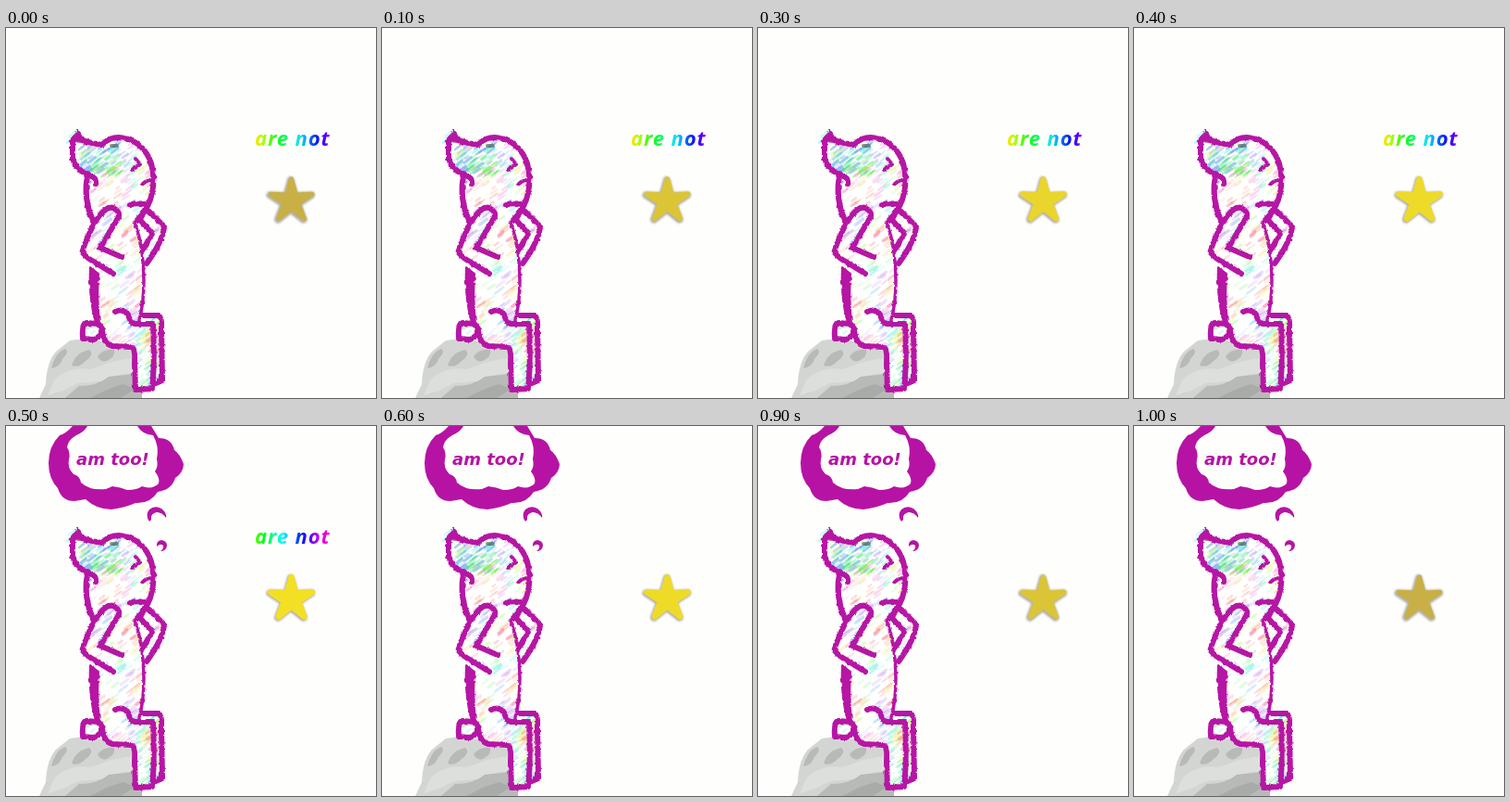
These frames come from a looping animation (400 by 399 pixels, 1.1 s). An HTML page:

```html
<!DOCTYPE html>
<html lang="en">
<head>
<meta charset="utf-8">
<title>Are not, am too</title>
<style>
  html, body { margin: 0; width: 100%; height: 100%; overflow: hidden; background: #fefefd; }
  svg { display: block; width: 400px; height: 399px; }
  .ink { fill: none; stroke: #b613a4; stroke-width: 6; stroke-linecap: round; stroke-linejoin: round; }
  .solid { fill: #b613a4; }
  .say { font: italic bold 18px "DejaVu Sans", sans-serif; }
  .reply { font: italic bold 22px "Open Sans", "Noto Sans", sans-serif; letter-spacing: .9px; fill: url(#rainbow); }
</style>
</head>
<body>
<svg viewBox="0 0 400 399">
  <defs>
    <linearGradient id="rainbow" gradientUnits="userSpaceOnUse" x1="269" x2="349" y1="0" y2="0"></linearGradient>
    <filter id="soft" x="-20%" y="-20%" width="140%" height="140%"><feGaussianBlur stdDeviation="1"/></filter>
    <filter id="rough" filterUnits="userSpaceOnUse" x="60" y="100" width="120" height="299">
      <feTurbulence type="fractalNoise" baseFrequency=".25" numOctaves="2" seed="3"/>
      <feDisplacementMap in="SourceGraphic" scale="3" xChannelSelector="R" yChannelSelector="G"/>
    </filter>
    <path id="head" d="M97 168C98 161 93 160 88 158C78 153 73 147 72 140L72 121L78 114C79 121 85 123 104 126C110 119 116 118 122 118C140 119 152 131 157 146C162 165 160 190 142 207L94 208C86 190 85 175 88 160Z"/>
    <path id="torso" d="M94 207L139 208Q149 236 149 272Q149 297 144 317L132 330L100 322Q94 300 95 258Z"/>
    <path id="arm" d="M116 265L90 249Q81 243 83 239Q94 209 104 199Q113 190 119 196Q124 200 121 205L102 237L125 247Z"/>
    <path id="farArm" d="M144 205L154 197L171 214Q170 229 152 254L148 239L158 222Z"/>
    <path id="tail" d="M100 319L86 318Q82 320 83 335L95 336Q103 333 104 324Z"/>
    <path id="leg" d="M104 326Q106 342 116 343L136 344Q140 346 139 362L140 390L158 389Q161 360 159 319L139 319Q134 317 132 309Q126 302 118 306Z"/>
    <path id="farLeg" d="M147 310L165 310Q169 312 168 325L169 380L161 383L160 319Z"/>
    <clipPath id="body"></clipPath>
  </defs>

  <g id="rock">
    <path fill="#d3d5d2" d="M36 399L43 384Q44 360 54 349L69 337L84 335L140 343L140 388L147 392V399Z"/>
    <path fill="#dddfdc" d="M53 379Q68 364 92 368Q118 357 138 356L138 372Q118 373 105 381L78 383L62 391L45 396Z"/>
    <g fill="#b8bab7">
      <path d="M49 367Q53 350 64 346Q69 349 61 357Q58 366 49 367Z"/>
      <path d="M71 364Q75 350 90 347Q96 352 86 359Q79 367 71 364Z"/>
      <path d="M99 354Q106 345 117 347Q119 354 109 359Q102 361 99 354Z"/>
      <path d="M64 399L79 386Q99 386 111 376L138 373L140 389L147 392V399Z"/>
    </g>
    <path fill="#a9aba8" d="M91 399L109 390L126 384L140 389L124 399Z"/>
  </g>

  <g id="skin" fill="#fffffe"></g>
  <g clip-path="url(#body)"><g id="hatch" stroke-linecap="round"></g></g>
  <g id="spill" stroke-linecap="round"></g>

  <g class="ink" filter="url(#rough)">
    <path d="M97 168C98 161 93 160 88 158C78 153 73 147 72 140L72 121L78 114C79 121 85 123 104 126C110 119 116 118 122 118C140 119 152 131 157 146C162 165 160 190 142 207"/>
    <path d="M88 160C85 175 86 190 94 208"/>
    <path stroke-width="3.5" d="M139 209Q149 236 149 272Q149 297 144 315"/>
    <path class="solid" stroke-width="2" d="M91 258Q89 290 97 318L101 318Q98 285 100 265Z" style="fill:#b613a4"/>
    <path d="M116 265L90 249Q81 243 83 239Q94 209 104 199Q113 190 119 196Q124 200 121 205L102 237L125 247"/>
    <path d="M150 196L155 198L171 214Q170 229 152 254"/>
    <path d="M145 207L158 222L148 239"/>
    <use href="#tail"/>
    <path d="M104 326Q106 342 116 343L136 344Q140 346 139 362L140 390L158 389Q161 360 159 319L139 319Q134 317 132 309Q126 302 118 306"/>
    <path d="M147 310L165 310Q169 312 168 325L169 380L162 383"/>
    <path stroke-width="4" d="M136 153L145 147L140 141M148 168Q152 164 158 164"/>
    <path d="M134 191Q139 188 150 190"/>
    <path style="fill:#b613a4" stroke-width="1" d="M70 122L77 110L82 123Z"/>
  </g>
  <path d="M114 127L120 127" stroke="#4c604a" stroke-width="4" stroke-linecap="round" opacity=".65"/>

  <g id="bubble">
    <path class="solid" d="M72 0Q65 8 58 10Q46 22 46 40Q46 57 56 67Q60 81 74 81L86 79Q98 90 114 90Q129 88 140 83Q156 84 164 71Q179 69 183 56Q192 50 192 41Q188 30 182 26Q179 13 165 13L157 0Z"/>
    <path fill="#fefefd" d="M88 0Q85 6 76 10Q67 15 66 23Q70 29 68 36Q66 45 73 52Q80 54 81 61Q91 70 108 68L115 65Q124 66 131 69Q142 69 147 65Q158 69 165 62Q167 57 161 49Q165 43 163 36Q166 22 159 10Q147 9 142 0Z"/>
    <path class="solid" d="M155 103Q150 96 155 90Q161 85 168 89Q174 94 173 99Q169 93 163 93Q156 94 157 101Z"/>
    <path class="solid" d="M163 130Q162 124 168 123Q174 124 174 129Q173 135 167 135Q171 132 170 129Q167 126 163 130Z"/>
    <text class="say solid" x="76" y="42">am too!</text>
  </g>

  <text id="reply" class="reply" x="269" y="127">are not</text>

  <g stroke-linejoin="round">
    <path id="shade" filter="url(#soft)" fill="#8a8577" stroke="#8a8577" stroke-width="8" opacity=".65" transform="translate(-.7 1)"/>
    <path id="star" stroke-width="6.5"/>
  </g>
</svg>

<script>
const $ = id => document.getElementById(id);

// Body parts share one fill and one clip.
const uses = ["farLeg", "farArm", "torso", "head", "tail", "leg", "arm"]
  .map(id => `<use href="#${id}"/>`).join("");
$("skin").innerHTML = $("body").innerHTML = uses;

let seed = 7;
const rand = () => (seed = seed * 16807 % 2147483647) / 2147483647;

function crayon(x, y, alpha, hue) {
  const len = 3 + 6 * rand();
  return `<path d="M${x} ${y}l${len} ${-len * 0.75}" stroke="hsl(${hue},85%,62%)"
    stroke-width="${1.5 + 2 * rand()}" opacity="${alpha * (0.3 + rand())}"/>`;
}

// Hue drifts smoothly over the body unless a base hue is given.
function scribble(count, x, y, w, h, alpha, base) {
  let out = "";
  while (count--) {
    const px = x + w * rand(), py = y + h * rand();
    const drift = 170 + 130 * Math.sin(px / 13 + py / 31) + 100 * Math.sin(py / 14 - px / 23);
    out += crayon(px, py, alpha, (base ?? drift) + 60 * rand());
  }
  return out;
}

$("hatch").innerHTML = scribble(650, 72, 110, 98, 280, 0.2)
  + scribble(40, 78, 128, 40, 28, 0.4, 180)
  + scribble(30, 90, 140, 35, 22, 0.4, 90)
  + scribble(60, 140, 310, 30, 75, 0.3);
$("spill").innerHTML = scribble(12, 65, 116, 14, 8, 0.25);

// Slim five-armed star; the round stroke plumps up its tips.
const starPath = "M" + Array.from({ length: 10 }, (_, i) => {
  const a = i * Math.PI / 5 - Math.PI / 2;
  const r = i % 2 ? 8 : 23.5;
  return `${308.5 + r * Math.cos(a)} ${186.5 + r * Math.sin(a)}`;
}).join("L") + "Z";
$("star").setAttribute("d", starPath);
$("shade").setAttribute("d", starPath);

const mix = (a, b, k) => a.map((v, i) => Math.round(v + (b[i] - v) * k));

function setRainbow(shift) {
  $("rainbow").innerHTML = Array.from({ length: 9 }, (_, i) =>
    `<stop offset="${i / 8}" stop-color="hsl(${54 + shift + i * 27},100%,50%)"/>`).join("");
}

let last = -1;
function draw(now) {
  const step = Math.floor(now % 1100 / 100);
  if (step !== last) {
    last = step;
    const glow = 1 - Math.abs(step - 5) / 5;
    const color = `rgb(${mix([200, 176, 70], [243, 224, 36], Math.sqrt(glow))})`;
    $("star").setAttribute("fill", color);
    $("star").setAttribute("stroke", color);
    $("star").setAttribute("stroke-width", 5 + 1.5 * glow);
    $("bubble").style.display = step >= 5 ? "" : "none";
    $("reply").style.display = step <= 5 ? "" : "none";
    setRainbow(step === 5 ? 45 : 0);
  }
  requestAnimationFrame(draw);
}
draw(performance.now());
</script>
</body>
</html>
```
